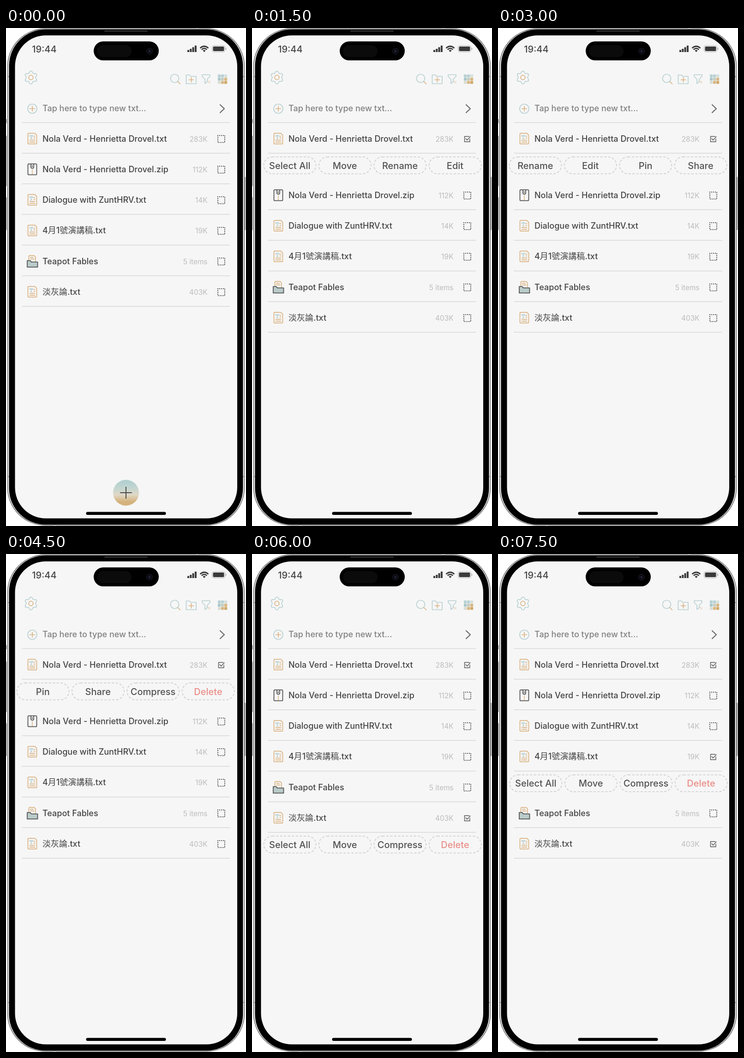
Animation of 520x1077 px, one loop 8000 ms. Source, as an HTML page:

```html
<!DOCTYPE html>
<html lang="zh-Hant">
<head>
<meta charset="utf-8">
<title>Text file list</title>
<style>
html, body { margin: 0; width: 100%; height: 100%; overflow: hidden; background: #fff; }
svg { display: block; width: 520px; height: 1077px; fill: none; }
text { font: 500 18px Inter, "Noto Sans CJK TC", "Noto Sans CJK", sans-serif; fill: #444; }
.size { font-size: 15.4px; font-weight: 400; fill: #bcbcbc; text-anchor: end; }
.action { font-size: 20px; fill: #525252; text-anchor: middle; }
.action.delete { fill: #ea8e88; }
.blue { stroke: #b9d0d1; stroke-width: 1.7; }
.tan { stroke: #dab382; stroke-width: 1.7; }
.dark { stroke: #555; stroke-width: 1.8; }
.rule { stroke: #d8d8d8; stroke-width: 1.5; }
path { stroke-linecap: round; stroke-linejoin: round; }
</style>
</head>
<body>
<svg viewBox="0 0 520 1077">
  <defs>
    <linearGradient id="fab" x1="0" y1="0" x2="0" y2="1">
      <stop offset=".1" stop-color="#b4d1d0"/>
      <stop offset=".35" stop-color="#c6d6d0"/>
      <stop offset=".58" stop-color="#e0d8c6"/>
      <stop offset=".85" stop-color="#d5b27c"/>
    </linearGradient>

    <g id="txt">
      <path class="tan" d="M-7.5 -11.5H5.5L9.5 -7.5V9.5Q9.5 11.5 7.5 11.5H-7.5Q-9.5 11.5 -9.5 9.5V-9.5Q-9.5 -11.5 -7.5 -11.5ZM3.5 -5H5.5M3.5 -1H5.5M-5.5 3.5H5.5M-5.5 7.5H5.5"/>
      <path class="blue" d="M-5.5 -4.5V-6.5H1V-4.5M-2.2 -6.5V0M-3.5 0H-1"/>
    </g>
    <g id="zip">
      <rect class="dark" x="-9.5" y="-11.5" width="19" height="23.5" rx="2"/>
      <path class="dark" d="M-3 -11.5V-4.5Q-3 -2 0 -2T3 -4.5V-11.5M0 -7.5V-5.5"/>
      <path stroke="#d9a868" stroke-width="2.2" d="M0 2V2.3M0 5.5V5.8M0 9V9.3"/>
    </g>
    <g id="folder">
      <path class="tan" d="M-7.5 0V-10Q-7.5 -12 -5.5 -12H4L7 -9V0M-4 -8H2M-4 -4.5H4"/>
      <path class="dark" fill="#b9cbc9" d="M-11 -1H-4.5L-2 2H11.5V13H-11Z"/>
    </g>
    <rect id="unchecked" x="-7.5" y="-7.5" width="15" height="15" stroke="#222" stroke-width="1.6" stroke-dasharray="2 2" stroke-dashoffset="1"/>
    <path id="checked" stroke="#555" stroke-width="1.4" d="M4 -5.5H-6V6H5.5V0M-3.5 -1L-.5 2.5L6.5 -5"/>
  </defs>

  <!-- phone body -->
  <path fill="#a5a5a5" d="M0 197h2v9h-2zM0 233h2v109h-2zM0 366h2v71h-2zM517 322h2.5v115h-2.5z"/>
  <rect x="3.5" y="1.5" width="513" height="1074" rx="82" fill="#f2f2f2" stroke="#555" stroke-width="1.3"/>
  <path stroke="#999" stroke-width="2" d="M3 105H6M514 105H517M3 970H6M514 970H517M412 2H417M103 1075H108"/>
  <rect x="6.5" y="3" width="507" height="1071" rx="79" fill="#000"/>
  <rect x="19.5" y="16" width="481.5" height="1044.5" rx="67" fill="#f6f6f6"/>
  <path stroke="#444" stroke-width="2" d="M214 6.5H306"/>
  <rect x="190" y="29" width="141" height="41" rx="20.5" fill="#000"/>
  <rect x="197" y="37" width="75" height="26" rx="13" fill="#0b0b0b"/>
  <circle cx="311" cy="50" r="6.5" fill="#0b0b13" stroke="#1c1c26"/>
  <circle cx="311" cy="50" r="2" fill="#2b2b42"/>

  <!-- status bar -->
  <text x="56.3" y="53.2" style="font-size:20px">19:44</text>
  <path fill="#3a3a3a" d="M393 47.5h4v4.500h-4zM398.3 45h4v7h-4zM403.6 41.5h4v10.5h-4zM408.9 38h4v14h-4z"/>
  <path stroke="#3a3a3a" stroke-width="2.7" style="stroke-linecap:butt" d="M420.5 43.5Q429.5 35.5 438.5 43.5M423.7 46.8Q429.5 41.5 435.3 46.8"/>
  <path fill="#3a3a3a" d="M426.3 48.8Q429.5 46 432.7 48.8L429.5 52Z"/>
  <rect x="446.5" y="38" width="28" height="14" rx="4" stroke="#b5b5b5"/>
  <rect x="448.5" y="40" width="24" height="10" rx="2" fill="#3a3a3a"/>
  <path stroke="#aaa" stroke-width="1.5" d="M476.5 43.5V46.5"/>

  <!-- toolbar -->
  <path id="gear" class="blue"/>
  <circle class="tan" cx="54" cy="107" r="4.8"/>
  <circle class="blue" cx="365.5" cy="109" r="9"/>
  <path class="tan" d="M372.5 116L377.5 121"/>
  <path class="blue" d="M390.5 101.5H397.5L400 104.5H412V120.5H390.5Z"/>
  <path class="tan" d="M396.5 112H406.5M401.5 107V117"/>
  <path class="blue" d="M425 101H442V104.5L436 111V116L431 120V111L425 104.5Z"/>
  <text x="437" y="120" style="font-size:8px;fill:#e6cfb4">N</text>
  <g id="grid"></g>

  <!-- new text row -->
  <circle class="blue" cx="57" cy="174.5" r="10"/>
  <path class="tan" d="M51.5 174.5H62.5M57 169V180"/>
  <text x="79" y="180.3" style="fill:#808080">Tap here to type new txt...</text>
  <path stroke="#686868" stroke-width="2.2" d="M464 166L473 174.5L464 183"/>
  <path class="rule" d="M35 204.5H485"/>

  <g id="list"></g>

  <g id="add">
    <circle cx="260" cy="1005" r="28" fill="url(#fab)"/>
    <path stroke="#4a4a4a" stroke-width="2" d="M248 1005H272M260 993V1017"/>
  </g>
  <rect x="173.5" y="1046.5" width="173" height="6.5" rx="3.25" fill="#000"/>
</svg>

<script>
const $ = id => document.getElementById(id);

const files = [
  ['txt', 'Nola Verd - Henrietta Drovel.txt', '283K'],
  ['zip', 'Nola Verd - Henrietta Drovel.zip', '112K'],
  ['txt', 'Dialogue with ZuntHRV.txt', '14K'],
  ['txt', '4月1號演講稿.txt', '19K'],
  ['folder', 'Teapot Fables', '5 items'],
  ['txt', '淡灰論.txt', '403K'],
];

// checked: ticked rows; open: row with the actions below it; x: left edge of the actions
const many = ['Select All', 'Move', 'Compress', 'Delete'];
const states = [
  { checked: [], open: -1 },
  { checked: [0], open: 0, x: 25.5, actions: ['Select All', 'Move', 'Rename', 'Edit'] },
  { checked: [0], open: 0, x: 24.5, actions: ['Rename', 'Edit', 'Pin', 'Share'] },
  { checked: [0], open: 0, x: 23.5, actions: ['Pin', 'Share', 'Compress', 'Delete'] },
  { checked: [0, 5], open: 5, x: 25.5, actions: many },
  { checked: [0, 3, 5], open: 3, x: 25.5, actions: many },
];
const HOLD = 1500, LOOP = 8000, PITCH = 66.25, GAP = 56;

function actionBar(names, x, y) {
  return names.map((name, i) => {
    const left = x + i * 119.4;
    return `<rect x="${left}" y="${y - 18.2}" width="113" height="36.5" rx="18.25"
        stroke="#d0d0d0" stroke-width="1.8" stroke-dasharray="5 3.5"/>
      <text class="action ${name.toLowerCase()}" x="${left + 56.3}" y="${y + 7.5}">${name}</text>`;
  }).join('');
}

function render({ checked, open, x, actions }) {
  $('add').style.display = open < 0 ? '' : 'none';
  $('list').innerHTML = files.map(([icon, name, size], i) => {
    const y = 239.2 + i * PITCH + (open >= 0 && i > open ? GAP : 0);
    const box = checked.includes(i) ? 'checked' : 'unchecked';
    return `<use href="#${icon}" x="57" y="${y}"/>
      <text x="79" y="${y + 6.3}">${name}</text>
      <text class="size" x="436.5" y="${y + 6.3}">${size}</text>
      <use href="#${box}" x="466.5" y="${y + 0.8}"/>
      <path class="rule" d="M35 ${y + 31.5}H485"/>`
      + (i === open ? actionBar(actions, x, y + 57.8) : '');
  }).join('');
}

function drawIcons() {
  const points = Array.from({ length: 72 }, (_, i) => {
    const a = i * Math.PI / 36, r = 12 - 2 * Math.cos(6 * a);
    return `${(54 + r * Math.cos(a)).toFixed(1)} ${(107 + r * Math.sin(a)).toFixed(1)}`;
  });
  $('gear').setAttribute('d', `M${points.join('L')}Z`);

  const tones = ['#b7d0d3', '#b7d0d3', '#d5dfdc', '#a9c6ca', '#c5cdbf', '#d7b681', '#d9dcd2', '#d7b681', '#d1a869'];
  $('grid').innerHTML = tones.map((tone, i) =>
    `<rect x="${459 + i % 3 * 7}" y="${100.5 + Math.floor(i / 3) * 7}" width="6.2" height="6.2" rx=".8" fill="${tone}"/>`).join('');
}

let shown = -1;
function tick() {
  const step = Math.floor(performance.now() % LOOP / HOLD);
  if (step !== shown) render(states[shown = step]);
  requestAnimationFrame(tick);
}

drawIcons();
tick();
</script>
</body>
</html>
```
